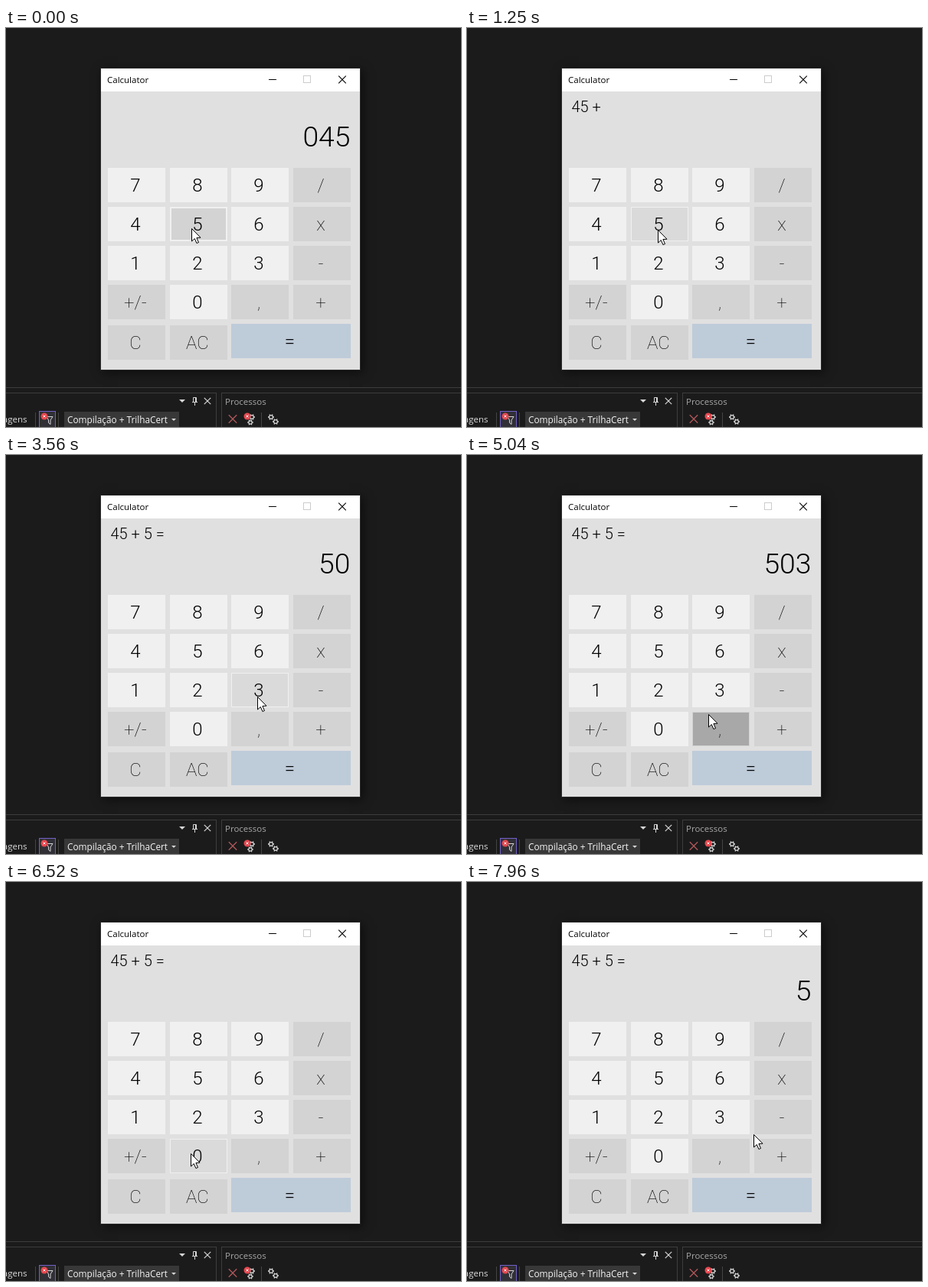
An HTML page with a canvas that plays this animation: 594x522 px, repeating every 8000 ms.

```html
<!DOCTYPE html>
<html lang="en">
<head>
<meta charset="utf-8">
<title>Calculator</title>
<style>
html, body { margin: 0; width: 594px; height: 522px; overflow: hidden; background: #1b1b1b; }
canvas { display: block; }
</style>
</head>
<body>
<canvas id="stage" width="594" height="522"></canvas>
<script>
const ctx = document.getElementById('stage').getContext('2d');
const LOOP = 8000;
const STEP = 140; // screen refresh while the pointer moves, ms
const PRESS = 130; // time a button is held down, ms
const UI = '"Open Sans", "Noto Sans", sans-serif';
const DIGITS = 'Roboto, sans-serif';
const INK = '#d6d6d6', EDGE = '#3d3d3d';

const palettes = {
  digit: { base: '#f0f0f0', hover: '#dadada', down: '#d3d3d3' },
  op: { base: '#d3d3d3', hover: '#a8a8a8', down: '#a0a0a0' },
  equals: { base: '#becbd9', hover: '#becbd9', down: '#becbd9' }
};

const buttons = ['7 8 9 /', '4 5 6 x', '1 2 3 -', '+/- 0 , +', 'C AC ='].flatMap((row, r) =>
  row.split(' ').map((label, c) => ({
    label,
    x: Math.round(133 + c * 80.7),
    y: 183 + r * 51 + (/C/.test(label) ? 2 : 0),
    w: label === '=' ? 156 : 75,
    h: 45,
    kind: /\d/.test(label) ? 'digit' : label === '=' ? 'equals' : 'op'
  })));

const contains = (b, x, y) => x >= b.x && x < b.x + b.w && y >= b.y && y < b.y + b.h;

// Pointer stops: arrival time, tip position, optional click and departure
const stops = [
  { at: 0, x: 242, y: 262 },
  { at: 557, x: 402, y: 355, click: 692 },
  { at: 1250, x: 249, y: 264, click: 1504 },
  { at: 2140, x: 403, y: 364 },
  { at: 2570, x: 370, y: 414, click: 2710, leave: 2850 },
  { at: 3560, x: 328, y: 316, click: 4080, leave: 4900 },
  { at: 5460, x: 276, y: 406 },
  { at: 5890, x: 172, y: 417, click: 6030, leave: 6260 },
  { at: 6520, x: 241, y: 355 },
  { at: 6820, x: 248, y: 262, click: 7260 },
  { at: 7960, x: 374, y: 330 }
].map(s => ({ leave: s.click ?? s.at, ...s }));

const clicks = stops.filter(s => s.click).map(s =>
  ({ time: s.click, label: buttons.find(b => contains(b, s.x, s.y)).label }));

function calculate(t) {
  let expression = '', value = '045';
  for (const { time, label } of clicks) {
    if (time > t) break;
    if (label === '+') {
      expression = `${+value} +`;
      value = '';
    } else if (label === '=') {
      const sum = parseInt(expression) + +value;
      expression += ` ${value} =`;
      value = String(sum);
    } else if (label === 'C') {
      value = '';
    } else {
      value += label;
    }
  }
  return { expression, value };
}

function pointerAt(t) {
  const i = stops.findLastIndex(s => s.at <= t);
  const from = stops[i], to = stops[i + 1];
  if (!to || t < from.leave) return from;
  const moved = Math.floor((t - from.leave) / STEP) * STEP;
  const k = moved / (to.at - from.leave);
  const mix = axis => Math.round(from[axis] + (to[axis] - from[axis]) * k);
  return { x: mix('x'), y: mix('y') };
}

function rect(x, y, w, h, color) {
  ctx.fillStyle = color;
  ctx.fillRect(x, y, w, h);
}

function text(str, x, y, font, color = '#000', align = 'left') {
  ctx.font = font;
  ctx.fillStyle = color;
  ctx.textAlign = align;
  ctx.fillText(str, x, y);
}

function trace(points) {
  ctx.beginPath();
  points.forEach(([x, y]) => ctx.lineTo(x, y));
}

function line(points, color, width = 1) {
  trace(points);
  ctx.strokeStyle = color;
  ctx.lineWidth = width;
  ctx.stroke();
}

function fill(points, color) {
  trace(points);
  ctx.fillStyle = color;
  ctx.fill();
}

function cross(x, y, r, color, width) {
  line([[x - r, y - r], [x + r, y + r]], color, width);
  line([[x - r, y + r], [x + r, y - r]], color, width);
}

const arrow = (x, y, r) => fill([[x - r, y], [x + r, y], [x, y + r]], INK);

function gear(x, y, r) {
  const spoke = (i, d) => [x + Math.cos(i * Math.PI / 3) * d, y + Math.sin(i * Math.PI / 3) * d];
  ctx.beginPath();
  ctx.arc(x, y, r, 0, 7);
  ctx.strokeStyle = INK;
  ctx.lineWidth = 1.2;
  ctx.stroke();
  for (let i = 0; i < 6; i++) line([spoke(i, r), spoke(i, r + 1.6)], INK, 1.3);
}

function errorBadge(x, y) {
  ctx.beginPath();
  ctx.arc(x, y, 4.5, 0, 7);
  ctx.fillStyle = '#e5484f';
  ctx.fill();
  cross(x, y, 1.4, '#fff', 1);
}

function drawPanel(x, w) {
  rect(x, 477, w, 45, EDGE);
  rect(x + 1, 478, w - 2, 44, '#1b1b1b');
}

function drawPanels() {
  rect(0, 0, 594, 522, '#1b1b1b');
  rect(0, 470, 594, 1, EDGE);
  drawPanel(-1, 276);
  drawPanel(281, 320);

  arrow(230, 486, 4);
  line([[244.5, 489], [244.5, 483.5], [248.5, 483.5], [248.5, 489]], INK);
  rect(247, 484, 1, 5, INK);
  rect(243, 489, 7, 1, INK);
  rect(246, 490, 1, 4, INK);
  cross(263, 488, 4.2, INK, 1.2);
  text('Processos', 286, 493, '11.5px ' + UI, '#a8a8a8');

  text('Mensagens', 27.5, 516, '11.5px ' + UI, '#dedede', 'right');
  for (const x of [38, 68, 333]) rect(x, 503, 1, 19, '#444');

  rect(43, 501, 22, 21, '#7160c8');
  rect(44, 502, 20, 20, '#303036');
  line([[53, 508.5], [61, 508.5], [58, 513], [58, 518.5], [55.5, 516.5], [55.5, 513], [53, 508.5]], INK);
  errorBadge(50, 508);

  rect(76, 502, 150, 20, '#383838');
  text('Compilação + TrilhaCert', 80, 517, '11.8px ' + UI, '#f5f5f5');
  arrow(219, 511, 3);

  cross(296, 511.5, 5.2, '#b0575b', 1.3);
  gear(321, 509, 2.4);
  gear(319, 516, 2.2);
  errorBadge(315, 508);
  gear(346, 509, 2.4);
  gear(352, 515, 2.4);
}

function drawWindow() {
  ctx.save();
  ctx.shadowColor = 'rgba(0,0,0,.55)';
  ctx.shadowBlur = 12;
  ctx.shadowOffsetX = ctx.shadowOffsetY = 3;
  rect(123, 52, 340, 396, '#2b2b2b');
  ctx.restore();
  rect(124, 53, 338, 394, '#e0e0e0');
  rect(124, 53, 338, 30, '#fff');
  text('Calculator', 132, 72, '11.5px ' + UI);
  rect(343, 67, 10, 1, '#000');
  ctx.strokeStyle = '#ccc';
  ctx.lineWidth = 1;
  ctx.strokeRect(388.5, 62.5, 9, 9);
  cross(439, 67.5, 4.8, '#000', 1.1);
}

function drawButton({ label, x, y, w, h, kind }, hovered, focused) {
  const colors = palettes[kind];
  rect(x, y, w, h, colors.base);
  if (hovered) {
    const edge = focused ? 2 : 1;
    rect(x + edge, y + edge, w - 2 * edge, h - 2 * edge, focused ? colors.down : colors.hover);
  }
  const weight = kind === 'op' ? 100 : 300;
  text(label, x + w / 2 - 1.5, y + 31, `${weight} 24px ${DIGITS}`, '#000', 'center');
}

function drawPointer(x, y) {
  const shape = [[0, 0], [0, 16.5], [3.8, 13], [6.4, 19], [9, 18], [6.4, 12], [11.5, 11.7], [0, 0]]
    .map(([dx, dy]) => [x + dx + .5, y + dy + .5]);
  fill(shape, '#fff');
  line(shape, '#000');
}

function draw(t) {
  const { x, y } = pointerAt(t);
  const { expression, value } = calculate(t);
  const focused = clicks.findLast(c => c.time - PRESS <= t)?.label ?? '5';
  drawPanels();
  drawWindow();
  text(expression, 136.5, 110, `300 20px ${DIGITS}`);
  text(value, 449.5, 155, `300 37.3px ${DIGITS}`, '#000', 'right');
  for (const b of buttons) drawButton(b, contains(b, x, y), b.label === focused);
  drawPointer(x, y);
}

const start = performance.now();
function tick() {
  draw((performance.now() - start) % LOOP);
  requestAnimationFrame(tick);
}
tick();
</script>
</body>
</html>
```
